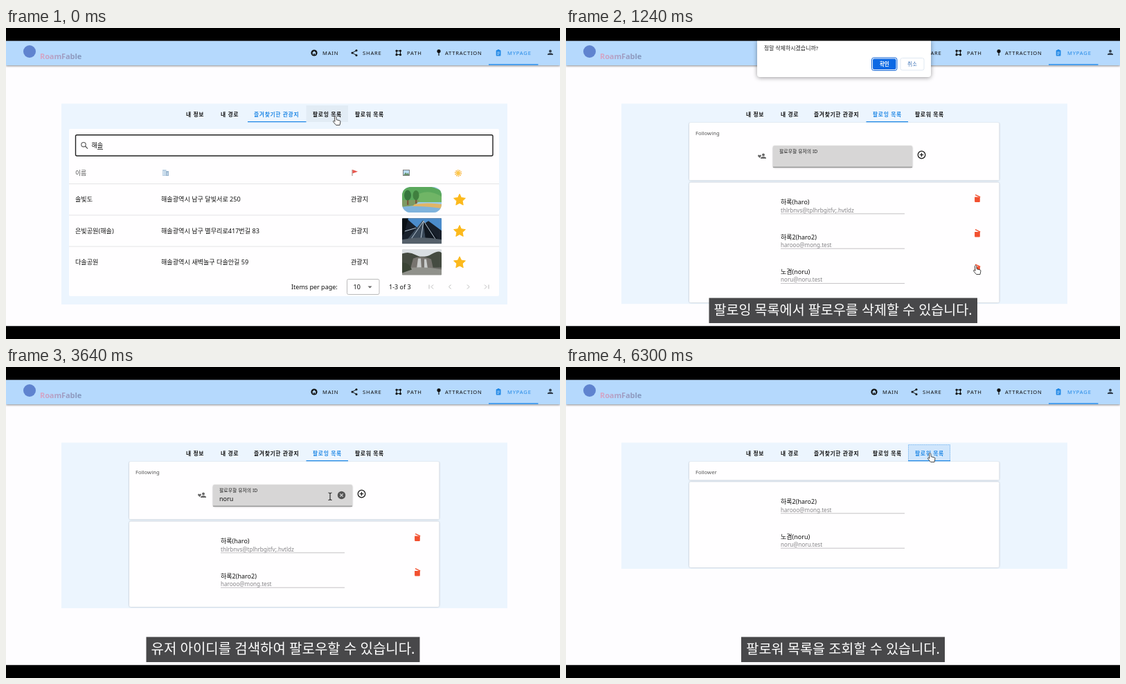
Animation, 800 px wide and 450 px high, one loop 6360 ms. Source, as an HTML page:

```html
<!DOCTYPE html>
<html lang="ko">
<head>
<meta charset="utf-8">
<style>
html, body { margin: 0; width: 100%; height: 100%; overflow: hidden; background: #000 }
svg { display: block; width: 800px; height: 450px; font-family: 'Noto Sans', 'Noto Sans CJK KR', sans-serif }
text { white-space: pre }
.nav { font-size: 7.6px; font-weight: 500; letter-spacing: .8px }
.tab { font-size: 7.8px; font-weight: 600; letter-spacing: .65px }
.card { fill: #fffeff; filter: drop-shadow(0 .6px .8px #0004) }
.field { filter: drop-shadow(0 1px 1px #0005) }
.bar { filter: drop-shadow(0 1px 1.5px #0007) }
.dialog { filter: drop-shadow(0 1.5px 3px #0006) }
</style>
</head>
<body>
<svg id="stage" viewBox="0 0 800 450"></svg>
<script>
const LOOP = 6360, STEP = 30, BLUE = '#2289e6', DARK = '#111';
const stage = document.getElementById('stage');
const clamp = v => Math.min(1, Math.max(0, v));
const mix = (a, b, p) => a + (b - a) * p;
const smooth = p => p * p * (3 - 2 * p);

// times of the events
const SLIDE_A = 70, SLIDE_B = 5083, SLIDE = 200;
const ASK = 1170, CONFIRM = 1790, FOLLOW = 3890;

function bezier(x, x1, y1, x2, y2) {
  const at = (s, a, b) => 3 * (1 - s) ** 2 * s * a + 3 * (1 - s) * s * s * b + s ** 3;
  let lo = 0, hi = 1;
  for (let i = 0; i < 24; i++) {
    const mid = (lo + hi) / 2;
    if (at(mid, x1, x2) < x) lo = mid; else hi = mid;
  }
  return at(lo, y1, y2);
}
const slide = (t, start) => bezier(clamp((t - start) / SLIDE), .25, .8, .5, 1);

const text = (x, y, size, s, fill = DARK, more = '') =>
  `<text x="${x}" y="${y}" font-size="${size}" fill="${fill}" ${more}>${s}</text>`;
const rect = (x, y, w, h, fill, more = '') =>
  `<rect x="${x}" y="${y}" width="${w}" height="${h}" fill="${fill}" ${more}/>`;
const circle = (x, y, r, fill, more = '') => `<circle cx="${x}" cy="${y}" r="${r}" fill="${fill}" ${more}/>`;
const path = (d, fill, more = '') => `<path d="${d}" fill="${fill}" ${more}/>`;
const line = (d, stroke, w = 1, more = '') => path(d, 'none', `stroke="${stroke}" stroke-width="${w}" ${more}`);
const move = (x, y, s) => `<g transform="translate(${x} ${y})">${s}</g>`;

const person = (x, y, fill) => move(x, y,
  circle(0, -2, 1.9, fill) + path('M-4 3.6V2.4C-3.6.2 3.6.2 4 2.4V3.6z', fill));

function header() {
  const items = [[457, 'MAIN'], [515, 'SHARE'], [579, 'PATH'], [634, 'ATTRACTION'], [724, 'MYPAGE']];
  return rect(0, 18.5, 800, 35.5, '#b5d9fd', 'class="bar"')
    + circle(34, 34, 9, '#5f83cf')
    + text(49, 45, 11, 'RoamFable', 'url(#brand)', 'font-weight="700" letter-spacing="-.1"')
    + items.map(([x, s]) => text(x, 38.8, 7.6, s, s == 'MYPAGE' ? BLUE : DARK, 'class="nav"')).join('')
    + circle(445, 36, 4.6, DARK) + path('M442 36l3-2.7 3 2.7h-.8v2.5h-1.5v-1.7h-1.4v1.7h-1.5V36z', '#b5d9fd')
    + line('M506 32.6L500 36l6 3.4', DARK, 1)
    + circle(506, 32.6, 1.5, DARK) + circle(500, 36, 1.5, DARK) + circle(506, 39.4, 1.5, DARK)
    + line('M564 33v5.5M564 33h5M569.500 33v5.500M564 38.500h6', DARK, 1)
    + [[564, 33], [564, 38.7], [569.5, 33], [569.5, 38.7]].map(([x, y]) => circle(x, y, 1.6, DARK)).join('')
    + circle(625, 33.6, 2.6, DARK) + line('M625 35v5', DARK, 1.2)
    + rect(707.7, 32, 6.8, 8.6, BLUE, 'rx="1"') + rect(709.6, 31, 3, 2, BLUE, 'rx=".8"')
    + line('M709.200 35h3.800M709.200 36.800h3.800M709.200 38.500h2.500', '#d5e9fd', .7)
    + rect(697, 52.2, 71.5, 1.4, BLUE)
    + person(786, 35.5, '#33404f');
}

const TABS = [['내 정보', 260], ['내 경로', 310], ['즐겨찾기한 관광지', 358, 349, 433.5],
  ['팔로잉 목록', 443, 433.5, 494], ['팔로워 목록', 504, 494, 555]];

function tabs(t, cursor) {
  const active = t < SLIDE_A ? 2 : t < SLIDE_B ? 3 : 4;
  const begin = active == 4 ? SLIDE_B : SLIDE_A;
  const q = clamp((t - begin) / SLIDE);
  const [, , l0, r0] = TABS[Math.max(2, active - 1)], [, , l1, r1] = TABS[active];
  const left = mix(l0, l1, q ** 1.7), right = mix(r0, r1, q ** 1.1);
  let out = '';
  TABS.forEach(([, , l, r], i) => {
    const over = l && cursor[0] >= l && cursor[0] < r && cursor[1] > 111 && cursor[1] < 136;
    if (!over) return;
    const press = i == 4 && t >= SLIDE_B, settle = clamp((t - SLIDE_B - 100) / 300);
    const strength = press ? mix(.3, .13, settle) : .05;
    out += rect(l, 112, r - l, 24, press ? '#1583f0' : '#345', `fill-opacity="${strength}"`);
    if (press) out += rect(l + .5, 112.5, r - l - 1, 23, 'none',
      `stroke="${BLUE}" stroke-width=".8" stroke-opacity="${.55 * settle}" stroke-dasharray="1 .6"`);
  });
  TABS.forEach(([s, x], i) => { out += text(x, 127.5, 7.8, s, i == active ? BLUE : DARK, 'class="tab"'); });
  const tone = t < SLIDE_A ? BLUE : `color-mix(in srgb, ${BLUE} ${q * 100}%, #1c4f85)`;
  return out + `<rect x="${left}" y="135" width="${right - left}" height="1.300" style="fill:${tone}"/>`;
}

function star(x, y) {
  let d = '';
  for (let i = 0; i < 10; i++) {
    const r = i % 2 ? 4.3 : 8.8, a = (i / 5 - .5) * Math.PI;
    d += (i ? 'L' : 'M') + (x + r * Math.cos(a)).toFixed(1) + ' ' + (y + r * Math.sin(a)).toFixed(1);
  }
  return path(d + 'z', '#fcb91c', 'stroke="#fcb91c" stroke-width="1" stroke-linejoin="round"');
}

const island = rect(0, 0, 57, 37, '#9ccbe8')
  + path('M0 4C14-4 42-4 57 6V20H0z', '#5aa85c') + path('M24 10Q40 3 57 14V22H22z', '#70b566')
  + path('M0 19H26L18 27 0 29z', '#7d9a63') + path('M18 25Q36 22 57 25V31H12z', '#e0b568')
  + path('M0 29Q25 26 57 31V37H0z', '#7fb3dc')
  + rect(7, 16, 2.4, 10, '#7a5a3c') + rect(19, 15, 2.4, 9, '#7a5a3c')
  + `<ellipse cx="8" cy="12" rx="5" ry="7.500" fill="#35763d"/><ellipse cx="20" cy="12" rx="4.500" ry="7" fill="#407f3f"/>`;
const hall = rect(0, 0, 57, 37, '#18202b') + path('M6 0H57V18L38 4 22 14z', '#4b8ccb')
  + path('M8 30L30 3 34 30z', '#394858') + path('M30 3L52 30H34z', '#101720')
  + line('M13 30L31 4 27 30M31 4L48 30M3 19L20 14', '#b9c8d6', 1) + path('M0 31Q28 25 57 31V37H0z', '#55606a')
  + path('M0 0H9L3 22 0 25z', '#0b1116');
const falls = rect(0, 0, 57, 37, '#6d6c68') + rect(0, 0, 57, 10, '#d9dee2')
  + path('M0 6Q10 2 20 8T42 7 57 5V26H0z', '#454b41') + path('M16 13Q27 8 42 14L45 28H12z', '#77746f')
  + path('M23 13h4l1 15h-7zM32 14h3l2 14h-5z', '#c9cccb') + path('M0 28Q28 23 57 29V37H0z', '#90918b')
  + path('M0 19Q10 18 14 29L0 34z', '#3a4335');

const PLACES = [['솔빛도', '해솔광역시 남구 달빛서로 250', island, 12],
  ['은빛공원(해솔)', '해솔광역시 남구 별무리로417번길 83', hall, 1],
  ['다솔공원', '해솔광역시 새벽놀구 다솔안길 59', falls, 1]];

function favorites() {
  const icons = rect(226, 205, 5.5, 9, '#b9cfe2') + rect(231, 207, 4, 7, '#9bb6cf')
    + line('M227.500 207v6M229.800 207v6M233 209v4', '#e6f2fc', .9)
    + line('M500 205v9', '#8b7770', .9) + path('M500.4 205l7.6 2.700-7.600 2.800z', '#e8574f')
    + rect(573.5, 205.5, 9, 8, '#b9dcf4', 'stroke="#777" stroke-width=".9"') + path('M574 213l3-4 2 2 1.500-1.500 2 3.500z', '#68926d')
    + circle(653, 210, 4.2, 'none', 'stroke="#f9b43c" stroke-width="1.600" stroke-dasharray="1.500 1.100"') + circle(653, 210, 2.9, '#fcc74d');
  const bold = 'font-weight="500"';
  const rows = PLACES.map(([name, address, image, round], i) => {
    const y = 248 + i * 45.3;
    return [[100, name], [224, address], [498, '관광지']].map(([x, s]) => text(x, y + 3.3, 9.1, s, DARK, bold)).join('')
      + `<clipPath id="thumb${i}"><rect width="57" height="37" rx="${round}"/></clipPath>`
      + move(572, y - 18, `<g clip-path="url(#thumb${i})">${image}</g>`) + star(655, y + 1)
      + line(`M91 ${y - 22.5}H712`, '#dedde0', .8);
  }).join('');
  return rect(91, 146, 621, 242, '#fffeff', 'rx="2"')
    + rect(100.5, 154.7, 602.5, 30.3, '#fffeff', 'rx="2" stroke="#222" stroke-width="1.400"')
    + circle(112, 168.7, 3.2, 'none', 'stroke="#555" stroke-width="1.100"') + line('M114.400 171l3.600 3.600', '#555', 1.3)
    + text(123.5, 173.3, 9.1, '해솔', DARK, bold) + line('M132 175.500h8', DARK, .8)
    + text(100, 212.6, 8.8, '이름', '#555') + icons + rows
    + text(412, 377.5, 9, 'Items per page:') + rect(492.5, 363.5, 46.5, 22, 'none', 'rx="2" stroke="#aaa" stroke-width=".8"')
    + text(501.5, 377.5, 9, '10') + path('M522.500 373.500h6l-3 3z', '#666') + text(553, 377.5, 9, '1-3 of 3')
    + line('M611 371.500v6M617 371.500l-3 3 3 3M642.500 371.500l-3 3 3 3M666 371.500l3 3-3 3M691 371.500l3 3-3 3M697 371.500v6', '#bbb', 1);
}

const USERS = {
  a: ['하록(haro)', 'thlrbnvs@tplhrbgitfv;.hvtldz'],
  b: ['하록2(haro2)', 'harooo@mong.test'],
  c: ['노겸(noru)', 'noru@noru.test']
};
const trash = (x, y) => move(x, y, path('M-3.900-2H3.800V4.600Q3.800 5.600 2.800 5.600H-2.900Q-3.900 5.600-3.900 4.600z', '#f2502f')
  + line('M-3-5.200L4.200-1.800', '#f2502f', 1.4));

const userRows = (keys, top, removable) => [...keys].map((key, i) => {
  const y = top + i * 50.4, [name, mail] = USERS[key];
  return text(310, y + 3.3, 9, name) + text(310, y + 14.5, 8.08, mail, '#858487')
    + line(`M310 ${y + 16.8}H489`, '#b5b4b7', .8) + (removable ? trash(594, y - 5.5) : '');
}).join('');

function following(t) {
  const keys = t < CONFIRM ? 'abc' : t < FOLLOW ? 'ab' : 'cab';
  const focus = clamp((t - ASK + 20) / 70) * clamp((FOLLOW + 60 - t) / 70);
  const typed = t < FOLLOW ? 'noru'.slice(0, clamp((t - 2700) / 520) * 4) : '';
  const grey = Math.round(mix(242, 215, focus));
  const caret = focus == 1 && Math.floor(t / 310) % 2 == 0;
  const caretX = 308.5 + typed.length * 4.9;
  return rect(178, 137, 447.5, 83.3, '', 'class="card" rx="1.500"')
    + rect(178, 223.5, 447.5, 22.6 + keys.length * 50.4, '', 'class="card" rx="2"')
    + text(187, 154.5, 7.7, 'Following', '#555')
    + person(285, 185.5, '#666') + path('M279.500 188l-2.300-2.600q-.6-1.800.900-2 .900 0 1.400.800.500-.8 1.400-.8 1.500.200.900 2z', '#666')
    + rect(299, 170.3, 201, 31, `rgb(${grey},${grey - 1},${grey - 1})`, 'class="field" rx="2"')
    + line('M299 201.300H500', '#777', .8)
    + text(308, mix(188.3, 181.2, focus), mix(9, 6.9, focus), '팔로우할 유저의 ID', focus > .5 ? '#222' : '#666')
    + text(308, 193.8, 9, typed)
    + (caret ? line(`M${caretX} 186.500v9.500`, '#222', .8) : '')
    + (typed ? circle(484.5, 185.5, 5.7, '#555') + line('M482.300 183.300l4.400 4.400M486.700 183.300l-4.400 4.400', '#ddd', 1.1) : '')
    + circle(513.5, 183.5, 5.3, 'none', `stroke="${DARK}" stroke-width="1.200"`)
    + line('M510.800 183.500h5.400M513.500 180.800v5.400', DARK, 1.2)
    + userRows(keys, 252, true);
}

const follower = () => rect(178, 137, 447.5, 26.5, '', 'class="card" rx="1.500"')
  + rect(178, 166.3, 447.5, 123.7, '', 'class="card" rx="2"')
  + text(187, 154.5, 7.7, 'Follower', '#555') + userRows('bc', 195, false);

function panels(t, cursor) {
  const a = slide(t, SLIDE_A), b = slide(t, SLIDE_B);
  const listBottom = t >= CONFIRM && t < FOLLOW ? 349 : 399.3;
  const bottom = t < SLIDE_B ? mix(400, listBottom, a) : mix(listBottom, 292, b);
  const shift = 639 * (a + b);
  const pages = [favorites, following, follower].map((page, i) => {
    const x = i * 639 - shift;
    return Math.abs(x) < 639 ? move(x, 0, page(t)) : '';
  }).join('');
  return rect(80, 109.5, 644, bottom - 109.5, '#ecf5fe')
    + `<clipPath id="window"><rect x="82" y="136.500" width="639.500" height="${bottom - 136.5}"/></clipPath>`
    + `<g clip-path="url(#window)">${pages}</g>` + tabs(t, cursor);
}

const dialog = () => path('M276 18H527V67Q527 71 523 71H280Q276 71 276 67z', '#fff', 'class="dialog"')
  + text(286, 31.6, 7.9, '정말 삭제하시겠습니까?', '#222')
  + rect(441.5, 43, 36.5, 18.5, '#fff', 'rx="3" stroke="#1467d8" stroke-width="1"')
  + rect(443, 44.5, 33.5, 15.5, '#0c69e4', 'rx="2"') + text(459.8, 54.8, 7.5, '확인', '#fff', 'text-anchor="middle" font-weight="600"')
  + rect(483, 43.5, 34, 17.5, '#fff', 'rx="2.500" stroke="#dce6f1" stroke-width=".9"')
  + text(500, 54.8, 7.5, '취소', '#4176b8', 'text-anchor="middle"');

const CAPTIONS = [[300, '팔로잉 목록에서 팔로우를 삭제할 수 있습니다.', 206.5, 387.5, 19.6],
  [2150, '유저 아이디를 검색하여 팔로우할 수 있습니다.', 202.5, 395, 20],
  [4800, '팔로워 목록을 조회할 수 있습니다.', 253, 294, 19.7]];

function caption(t) {
  const now = CAPTIONS.filter(c => t >= c[0]).pop();
  if (!now) return '';
  const [, s, x, w, size] = now;
  return rect(x, 390.6, w, 36.4, '#48484a') + text(400, 415.3, size, s, '#fff', 'text-anchor="middle"');
}

// time, x, y of the pointer tip
const POINTER = [[0, 475, 128], [250, 475, 128], [700, 588, 352], [900, 588, 352], [1130, 591, 344], [1300, 591, 344],
  [1650, 460, 50], [1800, 460, 50], [2300, 384, 189], [3300, 384, 189], [3600, 468, 187], [3650, 468, 187],
  [3840, 513, 182], [4200, 513, 182], [4700, 525, 125], [LOOP, 525, 125]];

function pointerAt(t) {
  const i = POINTER.findIndex(k => k[0] > t);
  const [t0, x0, y0] = POINTER[i - 1], [t1, x1, y1] = POINTER[i];
  const p = smooth((t - t0) / (t1 - t0));
  return [mix(x0, x1, p), mix(y0, y1, p)];
}

function pointer([x, y]) {
  const inField = x > 299 && x < 478 && y > 170 && y < 202;
  return move(x, y, inField
    ? line('M-2.500-5Q0-5 0-3.500Q0-5 2.500-5M0-3.500V4M-2.500 5.500Q0 5.500 0 4Q0 5.500 2.500 5.500', '#222', 1.1)
    : path('M-.7.600C-.5-.8 1.500-.7 1.700.6L2.200 4.700 7 6Q8.200 6.400 7.900 7.800L7 12.500H1.600L-2.400 7.800C-3.100 6.600-1.800 5.900-.9 6.600L0 7.400z',
      '#fff', 'stroke="#333" stroke-width=".9" stroke-linejoin="round"'));
}

const DEFS = `<defs><linearGradient id="brand"><stop stop-color="#dba6c6"/>
  <stop offset=".45" stop-color="#a99fc4"/><stop offset="1" stop-color="#7f97bd"/></linearGradient></defs>`;

function draw(t) {
  const cursor = pointerAt(t);
  stage.innerHTML = DEFS + rect(0, 18.5, 800, 413, '#fefdff') + panels(t, cursor) + header()
    + (t >= ASK && t < CONFIRM ? dialog() : '')
    + rect(0, 0, 800, 18.5, '#000') + rect(0, 431.5, 800, 18.5, '#000')
    + caption(t) + pointer(cursor);
}

const start = performance.now();
function tick() {
  const t = (performance.now() - start) % LOOP;
  draw(Math.floor(t / STEP) * STEP);
  requestAnimationFrame(tick);
}
tick();
</script>
</body>
</html>
```
